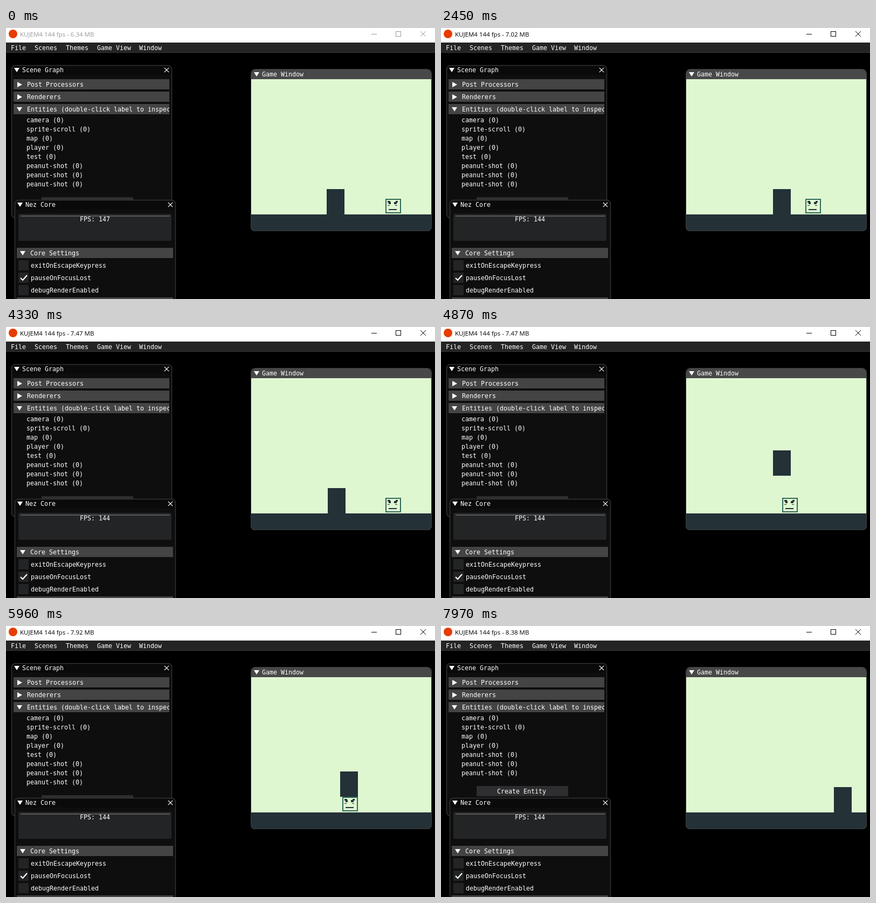
Recreate the animation shown at these times as an HTML page with a canvas. Size 796 by 503 pixels, loop 8000 ms.

```html
<!DOCTYPE html>
<html lang="en">
<head>
<meta charset="utf-8">
<title>Game editor</title>
<style>
  html, body { margin: 0; width: 100%; height: 100%; overflow: hidden; background: #000; }
  canvas { display: block; }
</style>
</head>
<body>
<canvas id="stage" width="796" height="503"></canvas>
<script>
const ctx = document.getElementById('stage').getContext('2d');
const LOOP = 8000, STEP = 10;
const MONO = '11.63px "DejaVu Sans Mono", monospace';
const TITLE = '11.5px "Open Sans", sans-serif';
const DARK = '#243137', PALE = '#dff7d1', TEAL = '#306a58', GREEN = '#88c070';
const FOCUS_AT = 200, ENEMY_DIES = 7740;
const ENEMY_X = 704, GROUND = 346, PLAYER_W = 33, PLAYER_H = 47, PIT_END = 434;

// Player's world x as [time, x].
const walk = [
  [0, 595], [1076, 595], [1560, 535], [2650, 669], [3440, 669], [4020, 597],
  [4330, 597], [4765, 672], [4940, 697], [5350, 631], [5940, 697], [6200, 733],
  [6590, 733], [6660, 746], [6750, 767], [6930, 809], [LOOP, 809]
];

// Jump arcs: start, end, time of peak, peak height, gravity factor.
const arcs = [
  [1415, 2135, 1775, 96, 1], [2606, 3180, 2893, 61, 1], [3440, 4160, 3800, 96, 1],
  [4330, 4759, 4579, 46, 1], [4759, 5515, 5119, 116, 1], [5560, 5995, 5809, 46, 1],
  [5995, 6200, 6200, 20, 0], [6200, 6364, 6200, 20, 1], [6488, 7208, 6848, 96, 1]
];

const memory = ['6.34', '6.56', '6.79', '7.02', '7.25', '7.47', '7.69', '7.92', '8.15', '8.38'];

function playerX(t) {
  const i = Math.max(1, walk.findIndex(k => k[0] >= t));
  const [t0, x0] = walk[i - 1], [t1, x1] = walk[i];
  return x0 + (x1 - x0) * (t - t0) / (t1 - t0);
}

function playerHeight(t) {
  const arc = arcs.find(a => t >= a[0] && t < a[1]);
  if (!arc) return 0;
  const [, , peakTime, peak, gravity] = arc;
  return Math.max(0, peak - gravity * 96 * ((t - peakTime) / 360) ** 2);
}

// The camera follows the player through a dead zone, so its path is precomputed.
function buildPoses() {
  const poses = [];
  let camX = 0, camY = 0;
  for (let t = 0; t <= LOOP; t += STEP) {
    const x = playerX(t), y = GROUND - PLAYER_H - playerHeight(t);
    const left = t < 3440 ? 595 : 597;
    camX = Math.min(80, Math.max(x - 616, Math.min(x - left, camX)));
    camY = Math.max(0, Math.max(207 - y, Math.min(225 - y, camY)));
    poses.push({ x: Math.round(x - camX), y: Math.round(y + camY), camX: Math.round(camX), camY: Math.round(camY) });
  }
  return poses;
}
const poses = buildPoses();

function rect(x, y, w, h, color) {
  ctx.fillStyle = color;
  ctx.fillRect(x, y, w, h);
}

function text(str, x, y, color = '#fff', font = MONO) {
  ctx.font = font;
  ctx.fillStyle = color;
  ctx.fillText(str, x, y);
}

function shape(points, color = '#fff') {
  ctx.fillStyle = color;
  ctx.beginPath();
  points.forEach(([x, y]) => ctx.lineTo(x, y));
  ctx.fill();
}

function line(points, color, width = 1) {
  ctx.strokeStyle = color;
  ctx.lineWidth = width;
  ctx.beginPath();
  points.forEach(([x, y]) => ctx.lineTo(x, y));
  ctx.stroke();
}

function cross(x, y, r, color, width) {
  line([[x - r, y - r], [x + r, y + r]], color, width);
  line([[x - r, y + r], [x + r, y - r]], color, width);
}

const arrowDown = (x, y) => shape([[x - 5, y - 4], [x + 5, y - 4], [x, y + 4]]);
const arrowRight = (x, y) => shape([[x - 4, y - 5], [x + 5, y], [x - 4, y + 5]]);

function panel(x, y, w, h, title, closeX) {
  ctx.beginPath();
  ctx.roundRect(x + .5, y + .5, w - 1, h - 1, 7);
  ctx.fillStyle = '#0e0e0e';
  ctx.fill();
  ctx.save();
  ctx.clip();
  rect(x, y, w, 18, '#0a0a0a');
  ctx.restore();
  ctx.strokeStyle = '#333335';
  ctx.lineWidth = 1.5;
  ctx.stroke();
  arrowDown(x + 10, y + 9);
  text(title, x + 20, y + 13);
  cross(closeX, y + 9, 4.2, '#fff', 1.2);
}

function header(x, y, w, label, open) {
  rect(x, y, w, 19, '#444');
  (open ? arrowDown : arrowRight)(x + 11, y + 10);
  ctx.save();
  ctx.beginPath();
  ctx.rect(x, y, w, 19);
  ctx.clip();
  text(label, x + 25, y + 14);
  ctx.restore();
}

function titleBar(t) {
  const ink = t < FOCUS_AT ? '#999' : '#000';
  const updates = t < 230 ? 0 : Math.min(9, 1 + Math.floor((t - 230) / 940));
  rect(0, 0, 796, 27, '#fff');
  ctx.fillStyle = '#e73c00';
  ctx.beginPath();
  ctx.arc(13, 11, 8, 0, 7);
  ctx.fill();
  text('KUJEM4', 26, 16, ink, TITLE);
  text(`144 fps - ${memory[updates]} MB`, 71, 16, ink, TITLE);
  line([[678, 11.5], [688, 11.5]], ink);
  ctx.strokeRect(723.5, 6.5, 9, 9);
  cross(774, 11, 5, ink, 1);
}

function menuBar() {
  rect(0, 27, 796, 19, '#242424');
  rect(0, 45, 796, 1, '#333a3a');
  [['File', 9], ['Scenes', 53], ['Themes', 111], ['Game View', 169], ['Window', 247]]
    .forEach(([label, x]) => text(label, x, 41));
}

function sceneGraph(t) {
  panel(10, 69, 298, 284, 'Scene Graph', 298);
  header(14, 95, 289, 'Post Processors', false);
  header(14, 118, 289, 'Renderers', false);
  header(14, 141, 289, 'Entities (double-click label to inspect)', true);
  const names = ['camera', 'sprite-scroll', 'map', 'player'];
  if (t < ENEMY_DIES) names.push('test');
  names.push('peanut-shot', 'peanut-shot', 'peanut-shot');
  names.forEach((name, i) => text(`${name} (0)`, 38, 175 + 17 * i));
  const y = 178 + 17 * names.length;
  rect(66, y, 170, 19, '#2e2e30');
  text('Create Entity', 104, y + 14);
}

function checkbox(y, label, checked) {
  rect(23, y, 19, 19, '#232426');
  if (checked) line([[27, y + 10], [31, y + 14], [39, y + 5]], '#fff', 2.2);
  text(label, 46, y + 14);
}

function corePanel(t) {
  panel(16, 319, 299, 200, 'Nez Core', 305);
  ctx.fillStyle = '#232426';
  ctx.beginPath();
  ctx.roundRect(23, 345, 284, 50, 2);
  ctx.fill();
  rect(27, 348, 277, 2, '#58595a');
  text(`FPS: ${t < 230 ? 147 : 144}`, 137, 359);
  header(20, 408, 290, 'Core Settings', true);
  checkbox(431, 'exitOnEscapeKeypress', false);
  checkbox(454, 'pauseOnFocusLost', true);
  checkbox(477, 'debugRenderEnabled', false);
  rect(20, 500, 290, 3, '#444');
}

function enemy(x, y) {
  ctx.strokeStyle = TEAL;
  ctx.lineWidth = 2;
  ctx.strokeRect(x + 1, y + 1, 27, 25);
  [
    [4, 4, 5, 3], [6, 6, 4, 4], [4, 12, 4, 1],
    [19, 4, 4, 3], [16, 6, 5, 4], [18, 12, 4, 1],
    [6, 19, 15, 2]
  ].forEach(([dx, dy, w, h]) => rect(x + dx, y + dy, w, h, DARK));
}

function gameWindow(t) {
  const { x, y, camX, camY } = poses[Math.floor(t / STEP)];
  const ground = GROUND + camY, pit = PIT_END - camX;
  ctx.save();
  ctx.beginPath();
  ctx.roundRect(455, 77, 334, 300, 7);
  ctx.clip();
  rect(455, 77, 334, 18, '#484848');
  rect(455, 95, 334, 282, PALE);
  rect(455, ground, 334, 40, DARK);
  if (pit > 455) {
    rect(455, ground, pit - 455, 16, TEAL);
    rect(455, ground + 16, pit - 455, 24, GREEN);
  }
  if (t < ENEMY_DIES) enemy(ENEMY_X - camX, 317 + camY);
  rect(x, y, PLAYER_W, PLAYER_H, DARK);
  ctx.restore();
  ctx.strokeStyle = '#3c3e3f';
  ctx.lineWidth = 1;
  ctx.beginPath();
  ctx.roundRect(454.5, 76.5, 335, 300, 7);
  ctx.stroke();
  arrowDown(465, 86);
  text('Game Window', 475, 90);
}

function draw(t) {
  rect(0, 0, 796, 503, '#000');
  titleBar(t);
  menuBar();
  sceneGraph(t);
  corePanel(t);
  gameWindow(t);
}

const start = performance.now();
function tick() {
  draw((performance.now() - start) % LOOP);
  requestAnimationFrame(tick);
}
tick();
</script>
</body>
</html>
```
